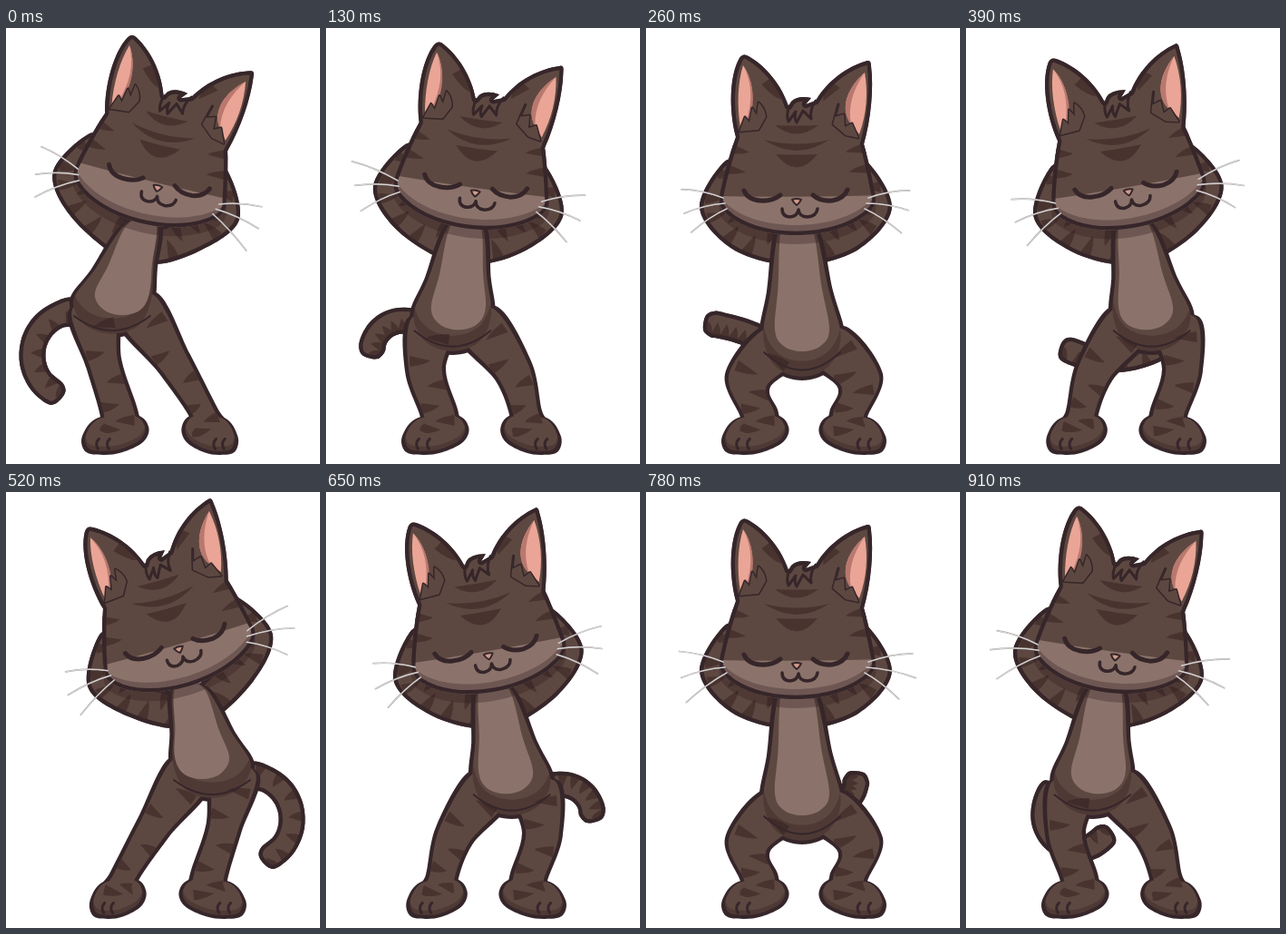
An HTML page with a canvas for the animation above (1.04 s loop, 346 px wide and 480 px high).

```html
<!DOCTYPE html>
<html lang="en">
<head>
<meta charset="utf-8">
<title>Dancing cat</title>
<style>
html, body { margin: 0; width: 100%; height: 100%; overflow: hidden; background: #fff; }
canvas { display: block; }
</style>
</head>
<body>
<canvas id="stage" width="346" height="480"></canvas>
<script>
const ctx = document.getElementById('stage').getContext('2d');
const STEP = 130, BEATS = 8, MIRROR = 348, LINE = 4.3;
const INK = '#36262a', FUR = '#5d4841', STRIPE = '#48332f', PALE = '#8b736b';
const SHADE = 'rgba(45,25,28,.3)';
const RAD = Math.PI / 180;

const mix = (a, b, t) => [a[0] + (b[0] - a[0]) * t, a[1] + (b[1] - a[1]) * t];
const random = seed => { const v = Math.sin(seed * 12.9898) * 43758.5453; return v - Math.floor(v); };

// Smooth closed path through the points.
function curve(pts) {
  const path = new Path2D(), n = pts.length, at = i => pts[(i + n) % n];
  path.moveTo(...pts[0]);
  for (let i = 0; i < n; i++) {
    const [a, b, c, d] = [at(i - 1), at(i), at(i + 1), at(i + 2)];
    path.bezierCurveTo(b[0] + (c[0] - a[0]) / 6, b[1] + (c[1] - a[1]) / 6,
      c[0] - (d[0] - b[0]) / 6, c[1] - (d[1] - b[1]) / 6, c[0], c[1]);
  }
  return path;
}

// Limb around a spine of [x, y, radius] points.
function limb(spine, inset = 0) {
  const left = [], right = [];
  spine.forEach(([x, y, r], i) => {
    const a = spine[Math.max(0, i - 1)], b = spine[Math.min(spine.length - 1, i + 1)];
    const len = Math.hypot(b[0] - a[0], b[1] - a[1]);
    const nx = (b[1] - a[1]) / len * (r - inset), ny = (a[0] - b[0]) / len * (r - inset);
    left.push([x + nx, y + ny]);
    right.push([x - nx, y - ny]);
  });
  return { left, right, path: curve([...left, ...[...right].reverse()]) };
}

function fill(path, color) { ctx.fillStyle = color; ctx.fill(path); }

function stroke(path, width, color = INK) {
  ctx.lineWidth = width;
  ctx.strokeStyle = color;
  ctx.stroke(path);
}

function clipped(path, draw) {
  ctx.save();
  ctx.clip(path);
  draw();
  ctx.restore();
}

// Shades the band of a shape left bare when it slides up by the given height.
function shadeRim(path, height) {
  const outside = new Path2D('M-99 -99H500V600H-99Z');
  outside.addPath(path, new DOMMatrix().translate(0, -height));
  ctx.fillStyle = SHADE;
  ctx.fill(outside, 'evenodd');
}

// Tapered fur stripe from an edge point towards another point.
function wedge(from, to, reach, half) {
  const dx = to[0] - from[0], dy = to[1] - from[1], len = Math.hypot(dx, dy) || 1;
  const nx = -dy / len * half, ny = dx / len * half;
  ctx.fillStyle = STRIPE;
  ctx.beginPath();
  ctx.moveTo(from[0] + nx, from[1] + ny);
  ctx.quadraticCurveTo(from[0] + dx * reach * .7 + nx * .8, from[1] + dy * reach * .7 + ny * .8,
    from[0] + dx * reach, from[1] + dy * reach);
  ctx.lineTo(from[0] - nx, from[1] - ny);
  ctx.fill();
}

function limbStripes({ left, right, path }, marks) {
  clipped(path, () => {
    for (let i = 0; i < left.length - 1; i++) {
      marks.forEach((t, j) => {
        const sides = [mix(left[i], left[i + 1], t), mix(right[i], right[i + 1], t)];
        wedge(sides[j % 2], sides[1 - j % 2], .6, 6);
      });
    }
  });
}

// Whole dance pose from one sway value: -1 far left, 1 far right.
function poseAt(beat) {
  const swing = -Math.cos(beat / BEATS * 2 * Math.PI);
  const s = Math.sign(swing) * Math.abs(swing) ** 1.5, bend = Math.abs(s);
  return {
    beat, s, bend,
    head: { x: 165 + 17 * s + 8 * s * s, y: 191 - 12.5 * bend, tilt: (-15 * s - bend) * RAD,
      faceX: 5 * bend - 4 * s, faceY: -5 * bend },
    neck: 166 + 26 * s + 10 * s * s,
    hip: 172 + 55 * s,
    waistY: 340 - 40 * bend,
    seatY: 388 - 47 * bend
  };
}

function headPoint({ x, y, tilt }, dx, dy) {
  const c = Math.cos(tilt), n = Math.sin(tilt);
  return [x + dx * c - dy * n, y + dx * n + dy * c];
}

function placeHead({ x, y, tilt }, drop = 0) {
  ctx.translate(x, y + drop);
  ctx.rotate(tilt);
  ctx.translate(-165, -191);
}

function headShadow(head) {
  ctx.save();
  placeHead(head, 10);
  fill(HEAD, SHADE);
  ctx.restore();
}

// Heading, total curl (degrees) and length of the tail on each beat.
const TAIL = [[180, -150, 125], [205, -110, 66], [208, -20, 62], [130, 75, 145],
  [0, 150, 125], [-25, 110, 66], [-20, -70, 36], [140, -190, 125]];

function drawTail({ beat, hip, bend }) {
  const [heading, curl, length] = TAIL[beat], steps = 6;
  const side = beat > 2 && beat < 7 ? 1 : -1;
  const spine = [];
  let x = hip + side * 40, y = 345 - 33 * bend;
  for (let i = 0; i <= steps; i++) {
    spine.push([x, y, 14.5]);
    const angle = (heading + curl * (i + .5) / steps) * RAD;
    x += Math.cos(angle) * length / steps;
    y += Math.sin(angle) * length / steps;
  }
  const a = spine[steps - 1], b = spine[steps];
  const len = Math.hypot(b[0] - a[0], b[1] - a[1]);
  spine.push([b[0] + (b[0] - a[0]) / len * 9, b[1] + (b[1] - a[1]) / len * 9, 8]);
  const tail = limb(spine);
  fill(tail.path, FUR);
  limbStripes(tail, [.5]);
  clipped(tail.path, () => stroke(tail.path, LINE * 2));
}

function drawArms({ head, neck }) {
  for (const side of [-1, 1]) {
    const arm = limb([
      [neck + side * 6, 243, 17],
      [...headPoint(head, side * 60, 36), 19],
      [...headPoint(head, side * 87, 5), 19],
      [...headPoint(head, side * 68, -40), 11]
    ]);
    fill(arm.path, FUR);
    limbStripes(arm, [.2, .45, .75]);
    clipped(arm.path, () => {
      headShadow(head);
      stroke(arm.path, LINE * 2);
    });
  }
}

function trunk(neck, hip, neckHalf, hipHalf, waistY, bottom) {
  const middle = neck + (hip - neck) * .6, middleY = 215 + (waistY - 215) * .6;
  const middleHalf = neckHalf + (hipHalf - neckHalf) * .6;
  const side = d => [[neck + d * neckHalf, 215], [middle + d * middleHalf, middleY],
    [hip + d * hipHalf, waistY], [hip + d * hipHalf * .68, waistY + (bottom - waistY) * .75]];
  return curve([...side(-1), [hip, bottom], ...side(1).reverse()]);
}

// Side -1 is the leg on the left; both legs share one mirrored rule.
function buildLeg({ s, bend, waistY }, side, inset) {
  const lean = -s * side, away = Math.max(0, lean);
  const place = x => side < 0 ? x : MIRROR - x;
  const half = 38 - 6 * away - inset, footX = 120 + 3 * away;
  const foot = (x, y) => [place(footX + x * half), 470 - inset + y * (34 - inset)];
  return {
    ...limb([
      [place(150 + 55 * lean), waistY + 6, 27],
      [place(112 + 4 * lean + 46 * away), 388 - 18 * bend, 26 - 6 * bend],
      [place(125 + 4 * away), 426, 21 - 5 * away],
      [place(122 + 3 * away), 446, 24]
    ], inset),
    foot: curve([foot(-.5, -1.2), foot(-.95, -.6), foot(-.85, -.1), foot(-.35, 0),
      foot(.2, -.08), foot(.82, -.42), foot(.98, -.9), foot(.6, -1.3)]),
    toes: [-.55, -.2].map(t => foot(t, -.08))
  };
}

function drawBody(pose) {
  const { neck, hip, waistY, seatY, head, s } = pose;
  const parts = inset => ({
    torso: trunk(neck, hip, 21 - inset, 47 - inset, waistY, seatY - inset),
    legs: [-1, 1].map(side => buildLeg(pose, side, inset))
  });
  const paint = ({ torso, legs }, color) =>
    [torso, ...legs.flatMap(l => [l.path, l.foot])].forEach(p => fill(p, color));

  paint(parts(0), INK);
  const inner = parts(LINE);
  paint(inner, FUR);
  inner.legs.forEach(l => limbStripes(l, [.35, .8]));
  clipped(inner.torso, () => {
    shadeRim(inner.torso, 17);
    fill(trunk(neck, hip - 11 * s, 15, 30, waistY - 8, waistY + 16), PALE);
    headShadow(head);
  });
  stroke(new Path2D(`M${hip - 42} ${waistY + 17}Q${hip} ${seatY + 8} ${hip + 42} ${waistY + 17}`), 2);
  for (const { foot, toes } of inner.legs) {
    clipped(foot, () => shadeRim(foot, 5));
    for (const [x, y] of toes) stroke(new Path2D(`M${x} ${y}q-4 -6 1 -11`), 3);
  }
}

const HEAD = new Path2D('M99 120C91 90 92 52 103 33Q107 27 113 31C132 42 149 62 157 86L160 81Q167 74 182 77L176 84L187 80C200 58 222 42 244 36Q248 35 248 42C251 66 248 100 240 128C245 145 249 165 252 181Q256 192 248 201C228 220 195 228 165 228C132 228 104 219 88 204Q79 196 81 185C85 165 90 145 99 120Z');
const EARS = new Path2D('M107 41C101 60 100 85 104 110C119 98 123 64 107 41ZM241 49C222 66 213 88 226 106L235 117C243 95 245 72 241 49Z');
const EAR_SHADE = new Path2D('M107 41C117 60 118 80 110 104C119 98 123 64 107 41ZM241 49C222 66 213 88 226 106C222 85 229 66 241 49Z');
const FLUFF = new Path2D('M103 114L109 98L114 104L117 88L122 96L124 82Q131 88 132 98L124 112ZM212 84L208 98L218 95L219 109L227 105L234 121L220 118L206 106Z');
const TUFT = new Path2D('M158 86Q154 96 157 103L165 92Q163 100 166 104L173 91L182 100Q180 90 187 80');
const LEFT_EYE = new Path2D('M108 179Q112 189 126 190Q139 191 148 184');
const RIGHT_EYE = new Path2D('M184 184Q192 191 205 190Q218 188 222 178');
const MOUTH = new Path2D('M150 199Q150 208 159 208Q167 207 168 200Q169 208 178 208Q188 207 189 199');
const NOSE = new Path2D('M161 189Q166 187 171 189Q168 194 166 195Q163 193 161 189Z');
const MUZZLE = new Path2D('M50 184Q165 188 285 183V245H50Z');

function drawMarks() {
  [24, 36, 23].forEach((half, i) => {
    const y = 107 + 16 * i, sag = 12 + 3 * i;
    fill(new Path2D(`M${166 - half} ${y}Q166 ${y + 9 - 8 * (i !== 1)} ${166 + half} ${y}Q166 ${y + sag * 1.6} ${166 - half} ${y}Z`), STRIPE);
  });
  for (const y of [132, 154]) {
    const spread = (y - 120) / 4;
    wedge([94 - spread, y], [166, y + 15], .3, 6);
    wedge([242 + spread, y], [166, y + 15], .32, 6);
  }
  wedge([133, 58], [156, 88], .7, 7);
  wedge([208, 62], [190, 88], .7, 7);
}

function drawHead(head) {
  ctx.save();
  placeHead(head);
  fill(HEAD, FUR);
  clipped(HEAD, () => {
    drawMarks();
    ctx.save();
    ctx.translate(0, head.faceY);
    fill(MUZZLE, PALE);
    ctx.clip(MUZZLE);
    ctx.translate(0, -head.faceY);
    shadeRim(HEAD, 11);
    ctx.restore();
    stroke(HEAD, LINE * 2);
  });
  fill(EARS, '#eaa596');
  fill(EAR_SHADE, '#b9786e');
  stroke(FLUFF, 3);
  fill(FLUFF, FUR);
  stroke(TUFT, 3);
  ctx.translate(head.faceX, head.faceY);
  stroke(LEFT_EYE, 5);
  stroke(RIGHT_EYE, 5);
  stroke(MOUTH, 3.5);
  fill(NOSE, '#d09a8c');
  stroke(NOSE, 2);
  ctx.restore();
}

function drawWhiskers(head, beat) {
  for (const side of [-1, 1]) {
    for (let i = 0; i < 3; i++) {
      const seed = beat * 6 + i * 2 + side;
      const angle = (-14 + 24 * i + 8 * (random(seed) - .5)) * RAD;
      const length = 46 + 10 * random(seed + 50);
      const dx = side * (80 - 2 * i), dy = -4 + 6 * i;
      const [x1, y1] = headPoint(head, dx, dy);
      const [x2, y2] = headPoint(head, dx + side * Math.cos(angle) * length, dy + Math.sin(angle) * length);
      const line = new Path2D(`M${x1} ${y1}Q${(x1 + x2) / 2} ${(y1 + y2) / 2 - 4} ${x2} ${y2}`);
      stroke(line, 1.7, '#aaa5a5');
      stroke(line, 1, '#dedada');
    }
  }
}

function render() {
  const pose = poseAt(Math.floor(performance.now() / STEP) % BEATS);
  ctx.fillStyle = '#fff';
  ctx.fillRect(0, 0, 346, 480);
  ctx.lineCap = ctx.lineJoin = 'round';
  drawTail(pose);
  drawArms(pose);
  drawBody(pose);
  drawHead(pose.head);
  drawWhiskers(pose.head, pose.beat);
  requestAnimationFrame(render);
}
render();
</script>
</body>
</html>
```
